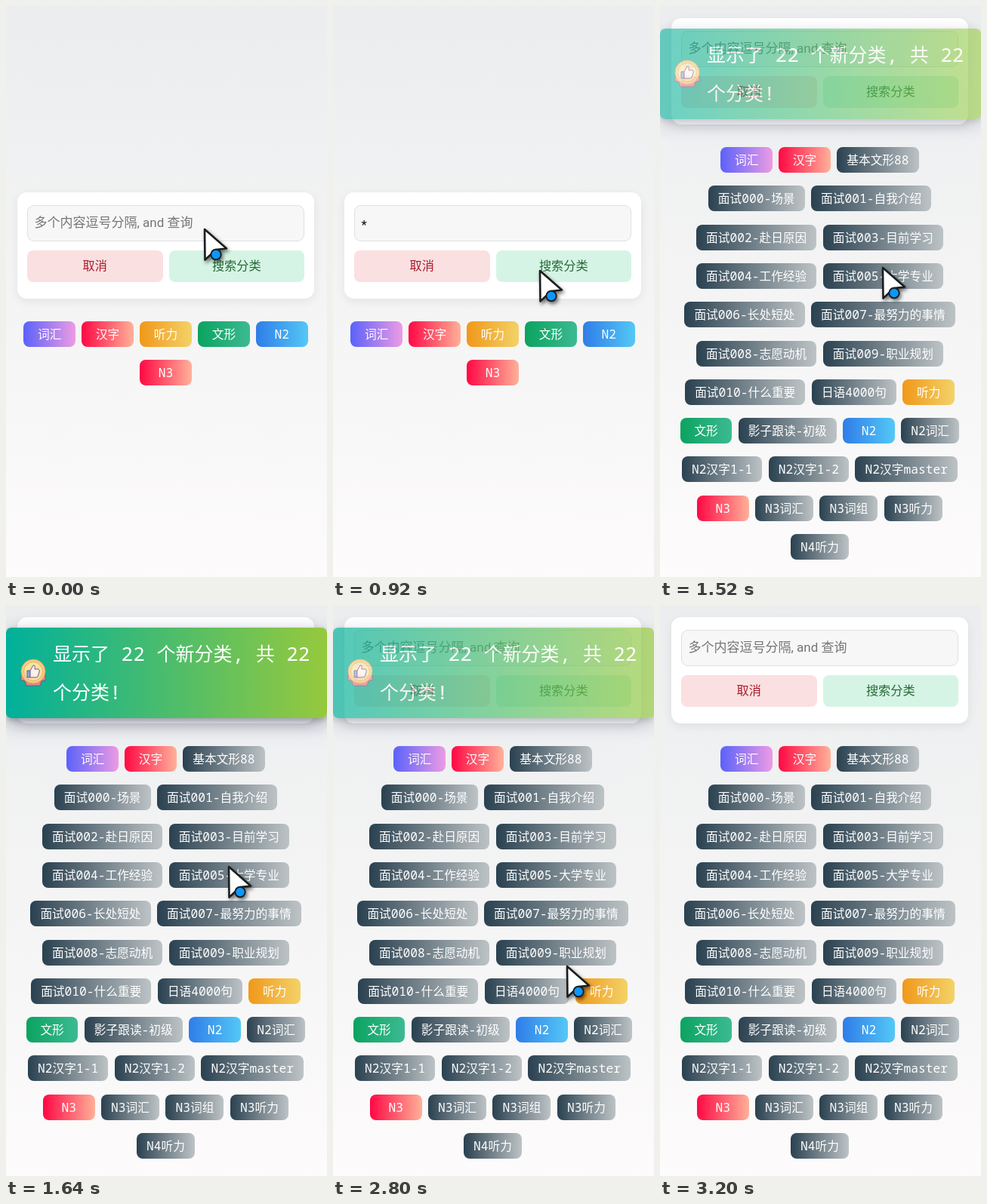
Recreate the animation shown at these times as an HTML page. Size 425 px wide and 757 px high, loop 3.44 s.

```html
<!DOCTYPE html>
<html lang="zh-CN">
<head>
<meta charset="utf-8">
<style>
  html, body { margin: 0; width: 100%; height: 100%; overflow: hidden; }
  body {
    position: relative;
    background: linear-gradient(to top, #fdfbfb, #ebedee);
    font: 16.2px Roboto, "Noto Sans CJK SC", "Noto Sans CJK", sans-serif;
  }
  div, svg { position: absolute; box-sizing: border-box; }
  #page { left: 0; top: 0; width: 425px; height: 757px; }
  .card {
    left: 15px; top: 247px; width: 393px; height: 141px;
    border-radius: 13px; background: #fff;
    box-shadow: 0 4px 13px rgba(0, 0, 0, .07);
  }
  .input {
    left: 13px; top: 16.5px; width: 367px; height: 48px;
    padding-left: 8.5px; border: 1.5px solid #dfe0e1; border-radius: 9px;
    background: #f7f7f7; color: #757575; font-size: 17px; line-height: 45px;
    white-space: pre;
  }
  #star { left: 8.5px; top: 3px; color: #111; }
  #caret { left: 15.5px; top: 12px; width: 1.5px; height: 20px; background: #111; }
  .btn {
    top: 77px; width: 179.5px; height: 42px; border-radius: 8px;
    line-height: 42px; text-align: center;
  }
  .no { left: 13px; background: #fbe0e1; color: #a81c2c; }
  .yes { left: 200.5px; background: #d6f4e5; color: #256a35; }
  .row {
    left: 0; width: 423px; height: 34px;
    display: flex; justify-content: center; gap: 8.4px;
  }
  .row span {
    box-sizing: border-box; min-width: 68.5px; padding: 0 13.1px;
    border-radius: 8px; text-align: center; white-space: pre; color: #fff;
    font: 15.7px/34px "Noto Sans Mono", "Noto Sans CJK SC", "Noto Sans CJK", monospace;
  }
  .row b { font-size: 16.25px; font-weight: 400; }
  #toast {
    left: 0; top: 30px; width: 425px; height: 120px; border-radius: 7px;
    background: linear-gradient(to right, #00b09b, #96c93d);
    box-shadow: 0 3px 7px rgba(0, 0, 0, .2), 0 10px 36px rgba(77, 96, 232, .1), 0 8px 22px rgba(0, 0, 0, .25);
    color: #fff;
  }
  #toast div {
    left: 62px; top: 9px; white-space: pre;
    font: 500 25px/51px "Noto Sans Mono", "Noto Sans CJK SC", "Noto Sans CJK", monospace;
  }
  #toast b { font-size: 26px; font-weight: 500; }
  #toast svg { left: 18px; top: 41px; }
  #cursor { left: 0; top: 0; overflow: visible; filter: drop-shadow(2px 3px 2.5px rgba(0, 0, 0, .55)); }
</style>
</head>
<body>
<div id="page">
  <div id="card" class="card">
    <div class="input"><span id="hint">多个内容逗号分隔, and 查询</span><div id="star">*</div><div id="caret"></div></div>
    <div class="btn no">取消</div>
    <div class="btn yes">搜索分类</div>
  </div>
  <div id="few"></div>
  <div id="all"></div>
  <div id="toast">
    <svg width="36" height="38" viewBox="0 0 36 38">
      <path d="M3 20L1 28L7 30L9 36H27L29 30L35 28L33 20Z" fill="#e5848c" stroke="#6b5a86"/>
      <circle cx="18" cy="17" r="16" fill="#f5cf7c" stroke="#d99a68"/>
      <circle cx="18" cy="17" r="12.5" fill="#f9e2a4" stroke="#e2b06c"/>
      <path d="M10 16H14V25H10Z" fill="#8fa4e0" stroke="#6b5a86"/>
      <path d="M14 16L18 9Q21 8 20 14H25Q27 15 26 18L24 24Q23 25 21 25H14Z" fill="#fff0ea" stroke="#6b5a86"/>
    </svg>
    <div id="message"></div>
  </div>
  <svg id="cursor" width="45" height="56">
    <path d="M1 1L30 26.5L16 28L1.5 41.5Z" fill="#fff" stroke="#1b1d20" stroke-width="2.6" stroke-linejoin="round"/>
    <circle cx="16" cy="34.5" r="6.7" fill="#0a98fb" stroke="#1b1d20" stroke-width="2"/>
  </svg>
</div>
<script>
const LOOP = 3440, TICK = 40;
const $ = id => document.getElementById(id);

const red = "#ff0844, #ffb199";
const colors = {
  "词汇": "#5b62fa, #ec9be4",
  "汉字": red,
  "听力": "#f09819, #f3d268",
  "文形": "#0ba360, #3cba92",
  "N2": "#2f7de8, #54c8f6",
  "N3": red
};
const fewRows = ["词汇 汉字 听力 文形 N2", "N3"];
const allRows = [
  "词汇 汉字 基本文形88",
  "面试000-场景 面试001-自我介绍",
  "面试002-赴日原因 面试003-目前学习",
  "面试004-工作经验 面试005-大学专业",
  "面试006-长处短处 面试007-最努力的事情",
  "面试008-志愿动机 面试009-职业规划",
  "面试010-什么重要 日语4000句 听力",
  "文形 影子跟读-初级 N2 N2词汇",
  "N2汉字1-1 N2汉字1-2 N2汉字master",
  "N3 N3词汇 N3词组 N3听力",
  "N4听力"
];

// Latin runs are set slightly larger than the Chinese text
const mixed = text => text.replace(/[ -~]+/g, "<b>$&</b>");
const tag = name =>
  `<span style="background:linear-gradient(to right, ${colors[name] || "#2a4150, #bdc3c5"})">${mixed(name)}</span>`;
const tagRows = (rows, top) => rows.map((row, i) =>
  `<div class="row" style="top:${top + i * 51.3}px">${row.split(" ").map(tag).join("")}</div>`).join("");

$("few").innerHTML = tagRows(fewRows, 417.5);
$("all").innerHTML = tagRows(allRows, 187);
$("message").innerHTML = mixed("显示了 22 个新分类, 共 22") + "<br>" + mixed("个分类!");

// Pointer positions: time, x, y
const path = [
  [0, 262, 295], [920, 273, 350], [1000, 277, 354], [1080, 282, 356],
  [1160, 287, 354], [1240, 291, 350], [1320, 294, 346],
  [2480, 303, 463], [2520, 309, 478]
];

const show = (id, on) => $(id).style.display = on ? "" : "none";
const within = (t, from, to) => t >= from && t < to;
const easeOut = p => 1 - (1 - Math.min(1, Math.max(0, p))) ** 3;

function toastOpacity(t) {
  if (!within(t, 1520, 3000)) return 0;
  return t < 2750 ? easeOut((t - 1480) / 160) : 1 - easeOut((t - 2750) / 400);
}

function draw(now) {
  const t = Math.floor(now % LOOP / TICK) * TICK;
  const found = t >= 1520;
  const typed = within(t, 480, 1520);
  show("few", !found);
  show("all", found);
  $("card").style.top = (found ? 16 : 247) + "px";
  show("hint", !typed);
  show("star", typed);
  show("caret", within(t, 520, 920) || within(t, 1400, 1520));
  $("toast").style.opacity = toastOpacity(t);

  const [, x, y] = path.filter(p => p[0] <= t).pop();
  show("cursor", t < 3200);
  $("cursor").style.transform = `translate(${x}px, ${y}px)`;
}

const start = performance.now();
function loop() {
  draw(performance.now() - start);
  requestAnimationFrame(loop);
}
loop();
</script>
</body>
</html>
```
